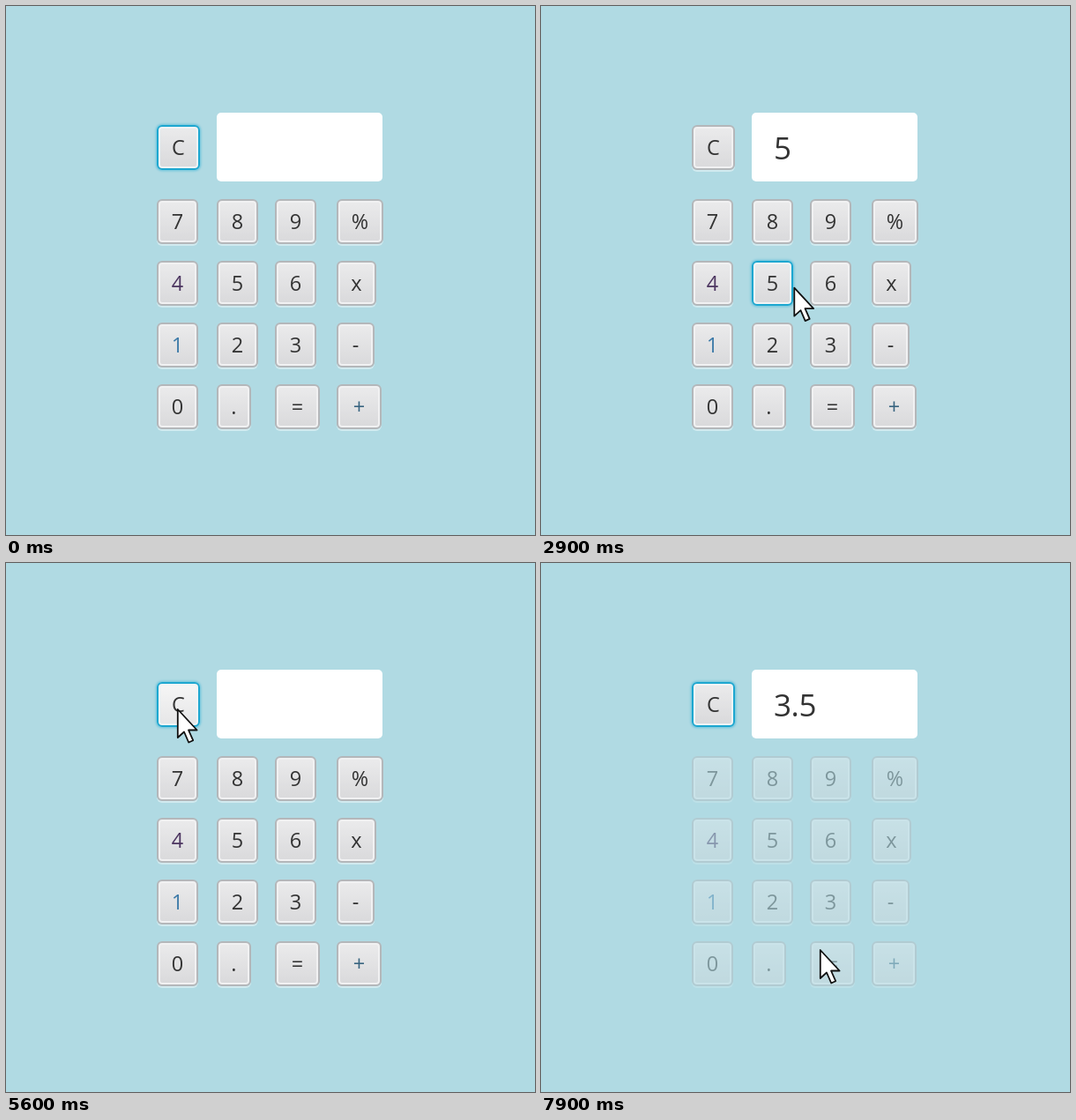
These frames come from a looping animation (600x600 px, 8 s). An HTML page:

```html
<!DOCTYPE html>
<html lang="en">
<head>
<meta charset="utf-8">
<title>Calculator</title>
<style>
  html, body { margin: 0; width: 100%; height: 100%; overflow: hidden; }
  body { background: #b0dae3; font-family: "Open Sans", "Noto Sans", sans-serif; color: #333; }
  #stage { position: absolute; left: 0; top: 0; width: 600px; height: 600px; overflow: hidden; }
  #screen {
    position: absolute; left: 239px; top: 121px; width: 188px; height: 78px;
    box-sizing: border-box; padding-left: 25px; border-radius: 5px;
    background: #fff; font-size: 35px; line-height: 79px; letter-spacing: -.4px;
  }
  .key {
    position: absolute; height: 51px; box-sizing: border-box;
    border: 2px solid #b4b7ba; border-radius: 6px;
    background: linear-gradient(#ebebec, #d9d9db);
    box-shadow: inset 0 0 0 2px #f1f1f2, 0 2px 0 rgba(255, 255, 255, .42);
    font-size: 23.5px; line-height: 47px; text-align: center;
  }
  .key.hover { background: linear-gradient(#f6f6f6, #e6e6e7); }
  .key.down { background: linear-gradient(#d4d5d6, #c9cacb); box-shadow: inset 0 0 0 2px #dcdddd; }
  .key.focus { border-color: #1da7d0; box-shadow: inset 0 0 0 2px #f1f4f5, 0 0 2px 1.5px rgba(40, 175, 215, .4); }
  .key.focus.down { box-shadow: inset 0 0 0 2px #d9dcdd, 0 0 2px 1.5px rgba(40, 175, 215, .4); }
  .key.off { opacity: .4; }
  #pointer { position: absolute; left: 0; top: 0; width: 28px; height: 44px; overflow: visible; }
</style>
</head>
<body>
<div id="stage">
  <div id="screen"></div>
  <svg id="pointer" viewBox="0 0 28 44">
    <path d="M.8 1V33L8 26.5L13.2 38.5L18.2 36.2L13 24.5H22.6Z"
      fill="#fff" stroke="#111" stroke-width="1.8" stroke-linejoin="round"/>
  </svg>
</div>
<script>
const LOOP = 8000, STEP = 100;
const stage = document.getElementById('stage');
const screen_ = document.getElementById('screen');
const pointer = document.getElementById('pointer');

const columns = [171, 239, 305, 375];
const rows = ['789%', '456x', '123-', '0.=+'];
const widths = { C: 49, '%': 53, x: 45, '-': 43, '.': 39, '=': 51, '+': 51 };
const tints = { 4: '#4c3560', 1: '#3c7aa8', '+': '#37637f' };
const keys = {};

function addKey(label, x, y) {
  const el = document.createElement('div');
  const w = widths[label] || 47;
  el.textContent = label;
  el.style.cssText = `left:${x}px;top:${y}px;width:${w}px;color:${tints[label] || '#333'}`;
  stage.insertBefore(el, pointer);
  keys[label] = { el, x, y, w };
}
addKey('C', 171, 135);
rows.forEach((row, r) => [...row].forEach((label, c) => addKey(label, columns[c], 219 + 70 * r)));

// Key, press time, release time
const clicks = [
  ['5', 2700, 2800], ['x', 3200, 3300], ['6', 3800, 3900], ['=', 4400, 4700],
  ['C', 5400, 5500], ['7', 6100, 6200], ['%', 6700, 6800], ['2', 7200, 7300],
  ['=', 7600, 7700]
];

// Pointer trips, each a list of [time, x, y]
const trips = [
  [[100, 190, 80], [400, 262, 300], [800, 392, 442], [1500, 392, 442], [2100, 192, 118]],
  [[2300, 300, 440], [2600, 264, 318], [2800, 264, 318], [3200, 408, 322], [3300, 400, 325],
   [3500, 400, 325], [3800, 330, 322], [3900, 330, 322], [4300, 332, 457], [5100, 332, 457],
   [5400, 194, 165], [5700, 194, 165], [6000, 196, 248], [6200, 196, 248], [6500, 424, 245],
   [6800, 424, 245], [7100, 264, 388], [7300, 264, 388], [7500, 316, 438], [8000, 316, 438]]
];

function pointerAt(t) {
  for (const trip of trips) {
    for (let i = 1; i < trip.length; i++) {
      const [t0, x0, y0] = trip[i - 1], [t1, x1, y1] = trip[i];
      if (t < t0 || t >= t1) continue;
      const p = (t - t0) / (t1 - t0), e = p * p * (3 - 2 * p);
      return { x: x0 + (x1 - x0) * e, y: y0 + (y1 - y0) * e };
    }
  }
  return null;
}

function stateAt(t) {
  const s = { text: '', focus: 'C', down: '', locked: false };
  let first = 0, op = '';
  for (const [label, press, release] of clicks) {
    if (t < press) break;
    s.focus = label;
    if (t < release) { s.down = label; break; }
    if (label === 'C') { s.text = ''; s.locked = false; }
    else if (label === '=') {
      s.text = String(op === 'x' ? first * s.text : first / s.text);
      s.locked = true;
      s.focus = 'C';
    } else if (/\d/.test(label)) s.text += label;
    else { first = +s.text; op = label; s.text = ''; }
  }
  return s;
}

function render(t) {
  const s = stateAt(t), p = pointerAt(t);
  screen_.textContent = s.text;
  pointer.style.display = p ? '' : 'none';
  if (p) pointer.style.transform = `translate(${p.x}px, ${p.y}px)`;
  for (const [label, k] of Object.entries(keys)) {
    const off = s.locked && label !== 'C';
    const over = p && p.x >= k.x && p.x < k.x + k.w && p.y >= k.y && p.y < k.y + 51;
    k.el.className = ['key', off && 'off', !off && over && 'hover',
      s.focus === label && 'focus', s.down === label && 'down'].filter(Boolean).join(' ');
  }
}

const start = performance.now();
let shown = -1;
function tick() {
  const t = Math.floor(Math.max(0, performance.now() - start) % LOOP / STEP) * STEP;
  if (t !== shown) render(shown = t);
  requestAnimationFrame(tick);
}
tick();
</script>
</body>
</html>
```
